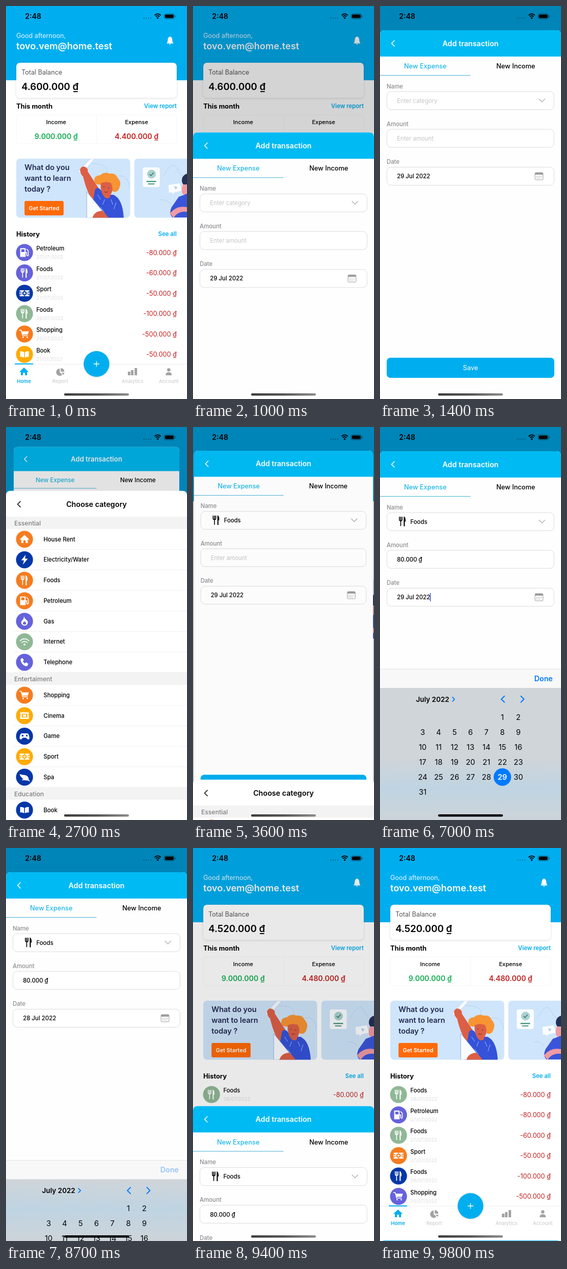
Write an HTML page that moves like this. It is 352 by 762 pixels and loops after 9900 ms.

```html
<!DOCTYPE html>
<html lang="en">
<head>
<meta charset="utf-8">
<title>Expense tracker</title>
<style>
  html, body { margin: 0; height: 100%; overflow: hidden; background: #fff; }
  svg { display: block; width: 100vw; height: 100vh; font-family: Inter, "Noto Sans", sans-serif; }
  .icon { fill: none; stroke: currentColor; stroke-width: 1.5; stroke-linecap: round; stroke-linejoin: round; }
  .icon .f { fill: currentColor; stroke: none; fill-rule: evenodd; }
  .shadow { filter: drop-shadow(0 1px 2px #0002); }
</style>
</head>
<body>
<svg id="stage" viewBox="0 0 352 762"></svg>
<script>
const LOOP = 9900, STEP = 100, W = 352, H = 762;
const BLUE = '#00aef0', RED = '#c41d1d', IOS = '#007aff', SKIN = '#dc5f45';
const PURPLE = '#6562dc', NAVY = '#0537a8', GREEN = '#90b896', ORANGE = '#f57c1f', AMBER = '#ffab00';

// y is the middle of the capitals
const text = (x, y, s, size, fill = '#000', weight = 400, anchor = 'start', id = '') =>
  `<text x="${x}" y="${y + size * .364}" font-size="${size}" fill="${fill}" font-weight="${weight}" text-anchor="${anchor}" id="${id}">${s}</text>`;
const rect = (x, y, w, h, fill, r = 0, extra = '') =>
  `<rect x="${x}" y="${y}" width="${w}" height="${h}" rx="${r}" fill="${fill}" ${extra}/>`;
const circle = (x, y, r, fill, extra = '') => `<circle cx="${x}" cy="${y}" r="${r}" fill="${fill}" ${extra}/>`;
const path = (d, fill = 'none', stroke = 'none', width = 1, extra = '') =>
  `<path d="${d}" fill="${fill}" stroke="${stroke}" stroke-width="${width}" ${extra}/>`;
const stroke = (d, color, width = 1.5) =>
  path(d, 'none', color, width, 'stroke-linecap="round" stroke-linejoin="round"');
const solid = d => `<path class="f" d="${d}"/>`;
const line = d => `<path d="${d}"/>`;
const dot = (x, y, r) => `<circle class="f" cx="${x}" cy="${y}" r="${r}"/>`;

const icons = {
  food: line('M-6-8v5q0 2 2.500 2t2.500-2v-5M-3.500-8v16') + solid('M2 9v-18q4 1 3.500 9.500h-1.500v8.500z'),
  pump: solid('M-8 8v-15q0-1 1-1h8q1 0 1 1v15zM-6-6v5h6v-5z') + line('M2 0h2v5q2 2 3 0v-8l-3-3'),
  sport: solid('M-9-5.500h8.300v2a3.500 3.500 0 0 0 0 7v2h-8.300v-2.500h3v-6h-3zM9-5.500h-8.300v2a3.500 3.500 0 0 1 0 7v2h8.300v-2.500h-3v-6h3z') +
    solid('M-9-1.800h2v3.600h-2zM9-1.800h-2v3.600h2z') + dot(0, 0, 2),
  cart: line('M-9-7h3l2.500 10h9') + solid('M-5-5h13l-2 6h-10z') + dot(-2.5, 6, 1.3) + dot(5, 6, 1.3),
  book: solid('M-.7 6q-3-2-7.300-1.500v-10q4.300-.5 7.300 1.500zM.7 6q3-2 7.300-1.500v-10q-4.300-.5-7.300 1.500z'),
  house: solid('M-8.500 0l8.500-8 8.500 8-1 1-1.500-1v7h-12v-7l-1.500 1zM-2 7h4v-5h-4z'),
  bolt: solid('M2-9l-8 10h5l-2 8 9-11h-5z'),
  flame: solid('M-1-9q1 4 4 6 4 3 3 6-1 5-6 5t-6-5q0-4 3-6 2-2 2-6zM0 0q-3 2-3 4t3 2 3-2-3-4z'),
  wifi: line('M-8-2q8-7 16 0M-5 1.500q5-4.500 10 0') + dot(0, 5, 1.8),
  phone: solid('M-7-6l3-2 3 4-2 2q1 3 4 4l2-2 4 3-2 4q-5 1-9-4t-3-9z'),
  screen: solid('M-8-6h16v3q-2 1 0 3v6h-16v-6q2-2 0-3zM-5-3.500v7h10v-7z') + solid('M-3-2h6v4h-6z'),
  game: solid('M-5-5h10q3 0 4 8 0 3-2 3-2 0-4-3h-6q-2 3-4 3-2 0-2-3 1-8 4-8zM-5-2.500v3h3v-3zM3-2.500v3h2.500v-3z'),
  leaf: solid('M-9-6q3 2 9 2 8 1 8 10-9 1-12-4-4-3-5-8z') + line('M-4 5h6M4 3l5 4'),
  pie: solid('M-1-6v7l5 5a7 7 0 1 1-5-12zM1-7a7 7 0 0 1 7 7h-7zM2 2h6q0 2-2 4z'),
  bars: solid('M-9 0h5v7h-5zM-3-3h5v10h-5zM4-7h5v14h-5z'),
  user: dot(0, -3.5, 3.2) + solid('M-6 7q0-6 6-6t6 6z'),
  bell: solid('M-6 5q2-2 2-6 0-5 4-6 4 1 4 6 0 4 2 6zM-2 6h4q-2 2.500-4 0z')
};
const icon = (name, x, y, color, k = 1) =>
  `<g class="icon" color="${color}" transform="translate(${x} ${y}) scale(${k})">${icons[name]}</g>`;
const badge = (name, y, color) => circle(36, y, 16.5, color) + icon(name, 36, y, '#fff', 1.06);
const backArrow = (y, color) => stroke(`M28 ${y - 5.5}l-5.500 5.500 5.500 5.500`, color);

const banners = `
  <g clip-path="url(#banner1)">${rect(20, 296, 222, 115, '#cfe5fb')}
    ${path('M168 306q30 0 28 14t20 10 24 22', 'none', '#8fb5d8', .8, 'stroke-dasharray="2 2"')}
    ${path('M140 321l24-25h9l-26 30z', '#f7fbff', '#9db8e8', .6)}
    ${path('M144 317q3-8 10-5 6 3 5 9l25 38-12 22q-14-16-22-50-6-6-6-14z', SKIN)}
    ${path('M173 357q3-7 10-2l8 11 18 0q18 8 20 45h-64q-4-16 4-32z', '#3552d8')}
    ${path('M178 366l6 9m8 0l-4 10m16-10l4 10m6-4l-4 13m-26-4l7 10', 'none', '#7fa0ff', 1.2)}
    ${path('M157 360v51h42z', '#f9fcff', '#7597e0', .7)}
    ${path('M168 411q4-14 20-14l12 14z', SKIN)}
    ${path('M172 340q-2-11 11-12 8-7 18-3 12-2 16 8 8 8 4 18-3 11-12 9l-26-14q-10 1-11-6z', '#f79433')}
    ${path('M184 344q8-5 20-1 6 12 0 22l-3 7q-6 3-10-2-8-10-7-26z', SKIN)}
    ${path('M189 351h3m6 2h3m-10 7q4 3 7 0', 'none', '#6d2c2c', 1)}
  </g>
  ${['What do you', 'want to learn', 'today ?'].map((s, i) => text(36, 313 + 21 * i, s, 14.4, '#22284f', 600)).join('')}
  ${rect(36, 378, 76, 28, '#ff6a08', 3)}${text(74, 392, 'Get Started', 10.8, '#fff', 600, 'middle')}
  <g clip-path="url(#banner2)">${rect(249, 296, 120, 115, '#cfe5fb')}
    ${path('M306 330q18-34 28-12t20 2M300 376q14-2 20 10', 'none', '#8fb5d8', .8, 'stroke-dasharray="2 2"')}
    ${rect(266, 313, 33, 38, '#fbfdff', 4)}${circle(283, 326, 8.5, '#a9d2cf')}${path('M279 326l3 3 5-6', 'none', '#34666b', 1.3)}
    ${rect(273, 339, 19, 2.5, '#4d9b80', 1)}${rect(276, 344, 13, 2, '#4d9b80', 1)}
    ${path('M316 347l22-3 4 14-14 3-4 4-1-4-6 1z', '#fbfdff')}${path('M327 350q2-2 3 1 3-2 3 1l-3 4z', '#a9cbe8')}
    ${circle(355, 338, 13, '#223057')}${path('M344 346q-4 10-1 18 5 5 14 2v-20z', '#f09aa5')}
    ${path('M322 390l14-20 16-6v46h-28q-8-7-2-20z', '#3a55d9')}${path('M319 402q12-16 33-12v9q-18-2-26 12z', '#f09aa5')}
  </g>`;

const homeView = (id, balance, expense, history) => `<g id="${id}">
  ${rect(0, 0, W, H, '#fff')}${rect(0, 0, W, 144, BLUE)}
  ${text(20, 57, 'Good afternoon,', 12.5, '#e9f8ff')}${text(20, 77, 'tovo.vem@home.test', 18, '#fff', 600)}
  ${icon('bell', 319, 67, '#fff', 1.1)}
  ${rect(20, 110, 312, 68, '#fff', 7, 'class="shadow"')}
  ${text(30, 128, 'Total Balance', 12.5, '#555')}${text(30, 156.5, balance + ' ₫', 18.5, '#000', 600)}
  ${text(20, 194, 'This month', 12.8, '#000', 700)}${text(332, 194, 'View report', 11.3, BLUE, 600, 'end')}
  ${rect(20, 211, 312, 56, '#fff', 6, 'stroke="#f3f5f5"')}${path('M176.500 211v56', 'none', '#f3f5f5')}
  ${text(97.5, 225, 'Income', 11, '#000', 500, 'middle')}${text(97.5, 252.5, '9.000.000 ₫', 14, '#12ad50', 600, 'middle')}
  ${text(254, 225, 'Expense', 11, '#000', 500, 'middle')}${text(254, 252.5, expense + ' ₫', 14, RED, 600, 'middle')}
  ${banners}
  ${text(20, 442, 'History', 12.8, '#000', 700)}${text(332, 442, 'See all', 11.3, BLUE, 600, 'end')}
  ${history.map(([name, art, color, day, sum], i) => {
    const y = 478 + 39.5 * i;
    return badge(art, y, color) + text(59, y - 8, name, 11.2, '#000', 500) +
      text(59, y + 9, day + '/07/2022', 9.4, '#dcdcdc') + text(332, y, `-${sum}.000 ₫`, 12.6, RED, 400, 'end');
  }).join('')}
  ${rect(0, 694, W, 68, '#fff')}${path('M0 694.500h352', 'none', '#eee')}${rect(17, 693, 36, 2, BLUE, 1)}
  ${[['Home', 'house', 35, BLUE], ['Report', 'pie', 105.5], ['Analytics', 'bars', 246], ['Account', 'user', 316.5]].map(
    ([name, art, x, color]) => icon(art, x, 709, color || '#a2a2a2') +
      text(x, 727.5, name, 9.6, color || '#cfcfcf', color ? 600 : 500, 'middle')).join('')}
  <g class="plus">${circle(176, 694, 25, BLUE, 'class="shadow"')}${path('M170.500 694h11m-5.500-5.500v11', 'none', '#fff', 1.3)}</g>
</g>`;

const field = (y, label) => text(13, y - 28, label, 11.3, '#8d8d92', 500) +
  rect(13.5, y - 17.5, 325, 35, '#fff', 8, 'stroke="#dcdcdc"');
const formView = `<g id="form">
  ${path('M0 800V56q0-9 9-9h334q9 0 9 9v744z', '#fefefe')}
  ${path('M0 98V56q0-9 9-9h334q9 0 9 9v42z', '#00baf3')}
  ${backArrow(72.5, '#fff')}
  ${text(176, 72.5, 'Add transaction', 14.2, '#fff', 600, 'middle')}
  ${text(88, 116.5, 'New Expense', 12.7, '#1fb8e6', 500, 'middle')}${text(264, 116.5, 'New Income', 12.7, '#000', 500, 'middle')}
  ${path('M0 134.500h176', 'none', '#45b0d6')}
  ${field(183.5, 'Name')}${field(256.5, 'Amount')}${field(330, 'Date')}
  ${text(33, 183.5, 'Enter category', 11.3, '#c4c4c6', 400, 'start', 'noCategory')}
  <g id="category">${icon('food', 44, 183, '#000', 1.05)}${text(59, 183.5, 'Foods', 11.3, '#000', 500)}</g>
  ${stroke('M309.500 180.500l5.500 5.500 5.500-5.500', '#b5b5b5')}
  ${text(33, 257, '', 11.3, '#000', 500, 'start', 'amount')}${text(33, 330, '', 11.3, '#000', 500, 'start', 'date')}
  ${rect(301.5, 323, 15.5, 14, 'none', 2, 'stroke="#9d9d9d"')}${rect(301.5, 323, 15.5, 4, '#9d9d9d', 1)}
  ${path('M304 330.500h11m-11 3h8', 'none', '#a9a9a9', 1.3, 'stroke-dasharray="1.500 1.500"')}
  ${rect(0, 249, 1.6, 16, '#3658dc', .5, 'id="amountCaret"')}${rect(97, 322, 1.6, 16, '#3658dc', .5, 'id="dateCaret"')}
  <g id="save">${rect(13, 682, 326, 39, BLUE, 7)}${text(176, 701.5, 'Save', 12.8, '#fff', 400, 'middle')}</g>
  ${path('M0 800V56q0-9 9-9h334q9 0 9 9v744z', '#000', 'none', 1, 'id="formDim"')}
</g>`;

const sections = [
  ['Essential', ['House Rent', 'house', ORANGE], ['Electricity/Water', 'bolt', NAVY], ['Foods', 'food', ORANGE],
    ['Petroleum', 'pump', ORANGE], ['Gas', 'flame', PURPLE], ['Internet', 'wifi', GREEN], ['Telephone', 'phone', PURPLE]],
  ['Entertaiment', ['Shopping', 'cart', ORANGE], ['Cinema', 'screen', AMBER], ['Game', 'game', NAVY],
    ['Sport', 'sport', AMBER], ['Spa', 'leaf', NAVY]],
  ['Education', ['Book', 'book', NAVY], ['Course', 'book', GREEN], ['Tuition', 'house', PURPLE]]
];
function categoryView() {
  let y = 50, out = '';
  for (const [title, ...rows] of sections) {
    out += rect(0, y, W, 24, '#f3f3f3') + text(16, y + 12.5, title, 12.1, '#7e7e82', 500);
    y += 24;
    for (const [name, art, color] of rows) {
      out += badge(art, y + 20, color) + text(73, y + 20, name, 11.2, '#000', 500) +
        path(`M15 ${y + 39.7}h337`, 'none', '#ececec', .8);
      y += 39.75;
    }
  }
  return `<g id="categories">${path('M0 760V9q0-9 9-9h334q9 0 9 9v751z', '#fff')}
    ${backArrow(26, '#000')}${text(176, 26, 'Choose category', 14.2, '#000', 600, 'middle')}${out}</g>`;
}

const days = Array.from({ length: 31 }, (_, i) => {
  const cell = i + 5, x = 83 + 31 * (cell % 7), y = 94 + 29 * Math.floor(cell / 7);
  return (i === 27 || i === 28 ? circle(x, y, 17, IOS, `id="ring${i + 1}"`) : '') +
    text(x, y, i + 1, 14.6, '#000', 400, 'middle', 'day' + (i + 1));
}).join('');
const pickerView = `${rect(0, 0, W, H, 'url(#glass)', 0, 'id="pickerBody"')}<g id="picker">
  ${rect(0, 0, W, 37, '#f8f8f8')}${path('M0 .5h352', 'none', '#e4e4e4')}
  ${text(336, 19, 'Done', 14.2, IOS, 600, 'end', 'done')}
  ${text(70, 59, 'July 2022', 13.4, '#000', 600)}${stroke('M141 55l4 4-4 4', IOS, 1.8)}
  ${stroke('M242 53l-6 6 6 6', IOS, 2)}${stroke('M274 53l6 6-6 6', IOS, 2)}${days}</g>`;

const statusBar = `${text(37, 20, '2:48', 14, '#000', 600)}
  ${[268, 272.5, 277, 281.5].map(x => circle(x, 23.5, 1.3, '#0004')).join('')}
  ${path('M289 18q6-5.500 12 0M291.300 20.500q3.700-3 7.400 0', 'none', '#000', 2)}${circle(295, 23.3, 1.7, '#000')}
  ${rect(307.5, 15, 20, 10, 'none', 3, 'stroke="#0006"')}${rect(309, 16.5, 17, 7, '#000', 1.8)}${rect(328.5, 18, 1.4, 4, '#0006', .7)}
  ${rect(113, 751, 126, 4.5, '#000', 2.2, 'id="indicator"')}`;

const oldRows = [['Petroleum', 'pump', PURPLE, 27, 80], ['Foods', 'food', PURPLE, 27, 60], ['Sport', 'sport', NAVY, 27, 50],
  ['Foods', 'food', GREEN, 26, 100], ['Shopping', 'cart', ORANGE, 25, 500], ['Book', 'book', AMBER, 21, 50]];
const newColors = [GREEN, PURPLE, GREEN, ORANGE, NAVY, PURPLE];
const newRows = [['Foods', 'food', GREEN, 28, 80], ...oldRows.slice(0, 5)]
  .map(([name, art, , ...rest], i) => [name, art, newColors[i], ...rest]);

document.getElementById('stage').innerHTML = `<defs>
  <clipPath id="banner1">${rect(20, 296, 221.5, 114.5, '#000', 7)}</clipPath>
  <clipPath id="banner2">${rect(249.5, 296, 120, 114.5, '#000', 7)}</clipPath>
  <linearGradient id="glass" gradientUnits="userSpaceOnUse" x1="0" y1="640" x2="0" y2="762">
    <stop stop-color="#d0d5d9"/><stop offset=".5" stop-color="#bfd4e2"/><stop offset="1" stop-color="#cdd4d9"/>
  </linearGradient>
  <linearGradient id="bar"><stop stop-color="#3c3c3c"/><stop offset=".5" stop-color="#555"/><stop offset="1" stop-color="#8c8c8c"/></linearGradient>
  </defs>
  ${homeView('homeBefore', '4.600.000', '4.400.000', oldRows)}${homeView('homeAfter', '4.520.000', '4.480.000', newRows)}
  ${rect(0, 0, W, H, '#000', 0, 'id="homeDim"')}${formView}${categoryView()}${pickerView}${statusBar}`;

const $ = id => document.getElementById(id);
const set = (id, attrs) => Object.entries(attrs).forEach(([k, v]) => $(id).setAttribute(k, v));
const show = (id, on) => set(id, { opacity: +on });

// Critically damped spring, settled after about 0.6 s
function spring(t, start) {
  const x = Math.max(0, t - start) * .013;
  return Math.min(1, 1.004 * (1 - (1 + x) * Math.exp(-x)));
}
const sheet = (t, open, close) => spring(t, open) - spring(t, close);
const typed = [[5200, '8'], [5500, '80'], [5600, '800'], [5800, '8.000'], [6000, '80.000']];
const plusButtons = document.querySelectorAll('.plus');

function draw(t) {
  const form = sheet(t, 805, 9235), list = sheet(t, 2399, 3314), cal = sheet(t, 6490, 8579);
  const saved = t >= 9200, picked = t >= 8000, chosen = t >= 3300;
  show('homeBefore', !saved);
  show('homeAfter', saved);
  plusButtons.forEach(b => b.setAttribute('opacity', t >= 700 && t < 900 ? .7 : 1));
  show('homeDim', .235 * form);

  const scale = 1 - .094 * list, top = 47 - 9 * list + (H - 47) * (1 - form);
  set('form', { transform: `translate(${176 * (1 - scale)} ${top - 47 * scale}) scale(${scale})` });
  show('formDim', .12 * list);
  set('categories', { transform: `translate(0 ${H - 705 * list})` });
  show('noCategory', !chosen);
  show('category', chosen);

  const entry = typed.filter(([at]) => t >= at).pop();
  $('amount').textContent = entry ? entry[1] + ' ₫' : 'Enter amount';
  set('amount', { fill: entry ? '#000' : '#c4c4c6', 'font-weight': entry ? 500 : 400 });
  set('amountCaret', { x: entry ? 33.5 + $('amount').getComputedTextLength() : 33 });
  const blink = t < 4700 || t >= 5200 ? 1 : Math.max(0, (4900 - t) / 300);
  show('amountCaret', t >= 4300 && t < 6500 ? blink : 0);
  show('dateCaret', t >= 6600 && t < 7500 ? (t < 7400 ? 1 : .5) : 0);
  $('date').textContent = (picked ? 28 : 29) + ' Jul 2022';
  show('save', t >= 9000 && t < 9200 ? .6 : 1);

  const pickerTop = H - 295 * cal;
  set('picker', { transform: `translate(0 ${pickerTop})` });
  set('pickerBody', { y: pickerTop + 37 });
  show('done', t >= 8500 ? .4 : 1);
  show('ring28', picked ? .15 : 0);
  show('ring29', !picked);
  set('day28', { fill: picked ? IOS : '#000', 'font-weight': picked ? 600 : 400 });
  set('day29', { fill: picked ? IOS : '#fff', 'font-weight': picked ? 400 : 600 });
  set('indicator', { fill: cal > .05 ? '#000' : 'url(#bar)' });
}

const began = performance.now();
function tick() {
  const t = (performance.now() - began) % LOOP;
  draw(Math.floor(t / STEP) * STEP);
  requestAnimationFrame(tick);
}
tick();
</script>
</body>
</html>
```
